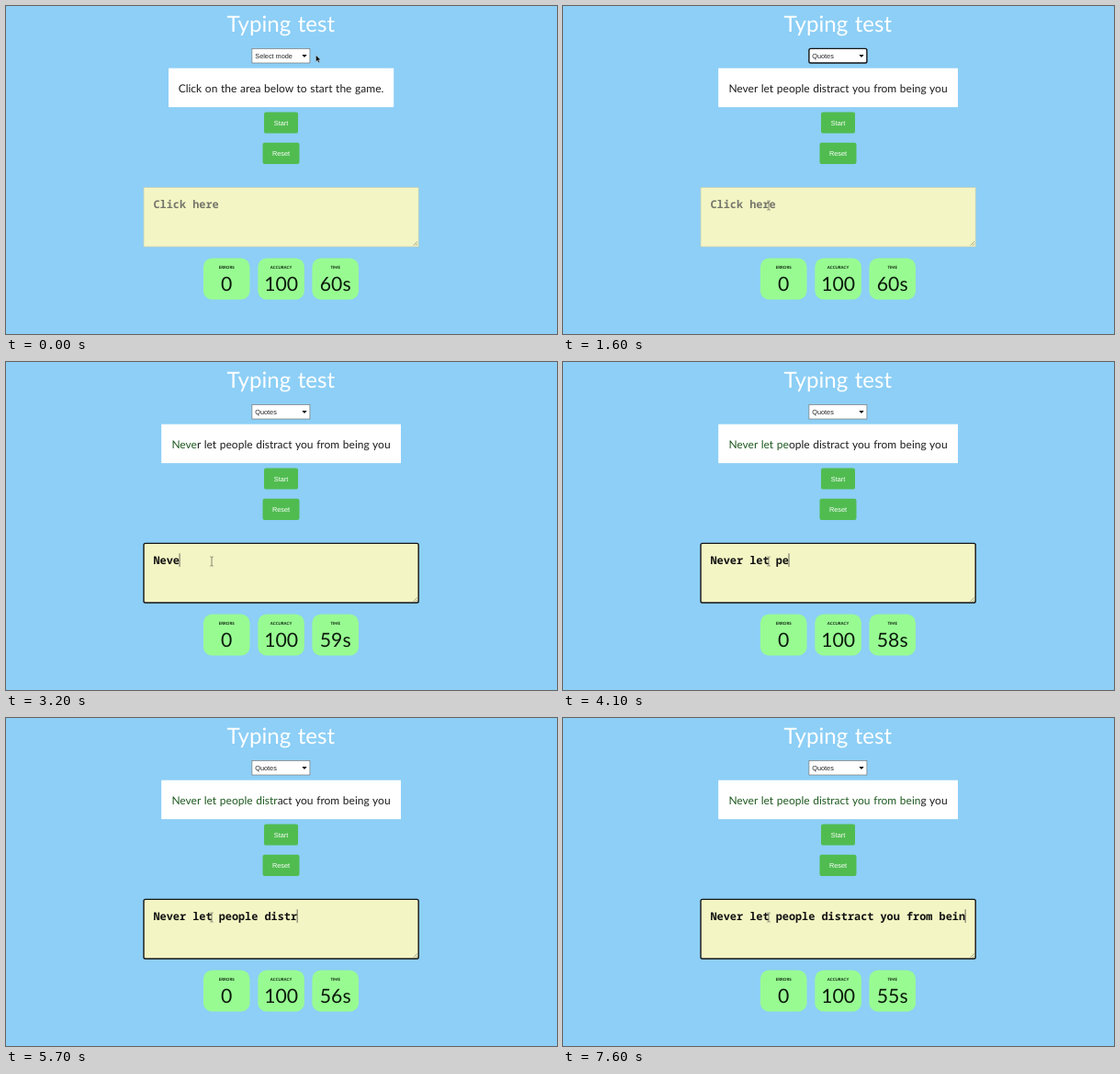
An HTML page for the animation above (7.7 s loop, 600 by 357 pixels).

```html
<!DOCTYPE html>
<html lang="en">
<head>
<meta charset="utf-8">
<title>Typing test</title>
<style>
  html, body { margin: 0; width: 100%; height: 100%; overflow: hidden; background: #8dcff6; }
  svg { display: block; width: 100%; height: 100%; }
  text { text-rendering: geometricPrecision; white-space: pre; }
  .sans { font-family: Lato, "Open Sans", sans-serif; }
  .ui { font-family: "Liberation Sans", Arial, sans-serif; font-size: 7.3px; }
  .menu { font-size: 7.05px; }
  .mono { font: bold 11.86px "Noto Sans Mono", "DejaVu Sans Mono", monospace; }
  .mid { text-anchor: middle; }
  .title { font-size: 24.1px; word-spacing: 1.3px; fill: #fff; }
  .prompt { font-size: 12px; word-spacing: .6px; fill: #1c1c1c; }
  .label { font-size: 4.4px; font-weight: bold; fill: #0b200b; }
  .value { font-size: 21.2px; fill: #0b1a0b; }
</style>
</head>
<body>
<svg viewBox="0 0 600 357">
  <rect width="600" height="357" fill="#8dcff6"/>
  <text class="sans title mid" x="299.3" y="28">Typing test</text>

  <rect id="select" x="267.9" y="46.4" width="63" height="15.6" fill="#fff"/>
  <text id="mode" class="ui" x="271.3" y="56.9" fill="#222"></text>
  <path d="M322.3 53h5.4l-2.7 2.9z" fill="#111"/>

  <rect id="panel" y="67.7" height="42.4" fill="#fff"/>
  <text class="sans prompt mid" x="299.5" y="93.6"><tspan id="done" fill="#1f5a20"></tspan><tspan id="rest"></tspan></text>

  <g id="buttons"></g>

  <rect id="area" x="150" y="197.4" width="299.2" height="64.6" fill="#f3f5c4"/>
  <path d="M443.6 260.6l4.4-4.4M446 260.8l2.2-2.2" stroke="#85877a" stroke-width=".7"/>
  <text id="entry" class="mono" x="160.5" y="220"></text>
  <path id="caret" d="M0 208.3v14.6" stroke="#444" stroke-width=".8"/>

  <g id="cards"></g>

  <g id="menu">
    <rect x="268.6" y="63" width="63.4" height="28" fill="#345" opacity=".25"/>
    <rect x="267.9" y="62.3" width="63" height="27.6" fill="#fff" stroke="#888" stroke-width=".6"/>
    <rect id="highlight" x="268.2" width="62.4" height="9" fill="#1e90f5"/>
  </g>
  <path id="arrow" d="M0 0v7.2l1.7-1.5 1.2 2.6 1.2-.6-1.2-2.5h2.3z" fill="#0a0a0a" stroke="#fff" stroke-width=".35"/>
  <path id="beam" d="M-1.7-5h1.2l.5.5.5-.5h1.2M0-4.5v9M-1.7 5h1.2l.5-.5.5.5h1.2" fill="none" stroke="#555" stroke-width=".7"/>
</svg>
<script>
const LOOP = 7700, STEP = 100;
const OPEN = 500, PICK = 1200, FOCUS = 1650;
const PROMPT = "Click on the area below to start the game.";
const QUOTE = "Never let people distract you from being you";
const MODES = ["Select mode", "Quotes", "Random words"];
const CHAR = 7.116;

// Each key: time, then value(s)
const pointer = [[0, 337.5, 53.5], [100, 337.5, 53.5], [400, 318, 54], [600, 316, 56],
                 [900, 305.5, 73.3], [1200, 305.5, 73.3], [1600, 224, 217]];
const typing = [[2700, 0], [4100, 12], [5700, 22], [7000, 33], [7600, 39]];

const $ = id => document.getElementById(id);
const show = (el, on) => el.setAttribute("visibility", on ? "visible" : "hidden");

function set(el, attrs) {
  for (const name in attrs) el.setAttribute(name, attrs[name]);
  return el;
}

function add(parent, tag, attrs, text = "") {
  const el = set(document.createElementNS("http://www.w3.org/2000/svg", tag), attrs);
  el.textContent = text;
  return parent.appendChild(el);
}

function sample(keys, t) {
  if (t <= keys[0][0]) return keys[0].slice(1);
  const i = keys.findIndex(key => key[0] > t);
  if (i < 0) return keys[keys.length - 1].slice(1);
  const a = keys[i - 1], b = keys[i], k = (t - a[0]) / (b[0] - a[0]);
  return a.slice(1).map((v, j) => v + (b[j + 1] - v) * k);
}

function button(label, width, y) {
  add($("buttons"), "rect", { x: 299.5 - width / 2, y, width, height: 23.2, rx: 2.2, fill: "#50bc50" });
  add($("buttons"), "text", { class: "ui mid", x: 299.5, y: y + 14.1, fill: "#fff" }, label);
}

function card(label, value, x) {
  add($("cards"), "rect", { x: x - 25.3, y: 274.5, width: 50.6, height: 45.1, rx: 9.5, fill: "#98fb92" });
  add($("cards"), "text", { class: "sans label mid", x, y: 285.5 }, label);
  return add($("cards"), "text", { class: "sans value mid", x, y: 310 }, value);
}

button("Start", 37, 115.4);
button("Reset", 40, 148.8);
card("ERRORS", "0", 240.2);
card("ACCURACY", "100", 299.6);
const timer = card("TIME", "60s", 358.7);
const items = MODES.map((name, i) =>
  add($("menu"), "text", { class: "ui menu", x: 272, y: 69.2 + 9 * i }, name));

function outline(el, focused, idle) {
  set(el, { stroke: focused ? "#151515" : idle, "stroke-width": focused ? 1.4 : .7, rx: focused ? 1.8 : 0 });
}

function render(t) {
  const picked = t >= PICK, focused = t >= FOCUS, open = t >= OPEN && !picked;
  const count = Math.floor(sample(typing, t)[0] + 1e-6);
  const [x, y] = sample(pointer, t);

  outline($("select"), t >= OPEN && !focused, "#777");
  outline($("area"), focused, "#c3cfb9");
  $("mode").textContent = MODES[picked ? 1 : 0];

  const width = picked ? 260.8 : 245.2;
  set($("panel"), { x: 299.6 - width / 2, width });
  $("done").textContent = QUOTE.slice(0, count);
  $("rest").textContent = picked ? QUOTE.slice(count) : PROMPT;

  $("entry").textContent = count ? QUOTE.slice(0, count) : "Click here";
  set($("entry"), { fill: count ? "#111" : "#75766b" });
  set($("caret"), { transform: `translate(${160.6 + count * CHAR} 0)` });
  show($("caret"), focused);

  show($("menu"), open);
  const hover = y > 71.5 ? 1 : 0;
  set($("highlight"), { y: 62.5 + 9 * hover });
  set($("highlight"), { y: hover ? 71.6 : 62.5 });
  items.forEach((item, i) => set(item, { fill: i === hover ? "#fff" : "#222" }));

  const overArea = y > 197;
  for (const [id, on] of [["arrow", !overArea], ["beam", overArea]]) {
    show($(id), on);
    set($(id), { transform: `translate(${x} ${y})` });
  }

  const elapsed = Math.max(0, Math.floor((t - FOCUS) / 1000));
  timer.textContent = 60 - elapsed + "s";
}

const start = performance.now();
function tick(now) {
  const t = Math.max(0, now - start) % LOOP;
  render(Math.floor(t / STEP) * STEP);
  requestAnimationFrame(tick);
}
render(0);
requestAnimationFrame(tick);
</script>
</body>
</html>
```
